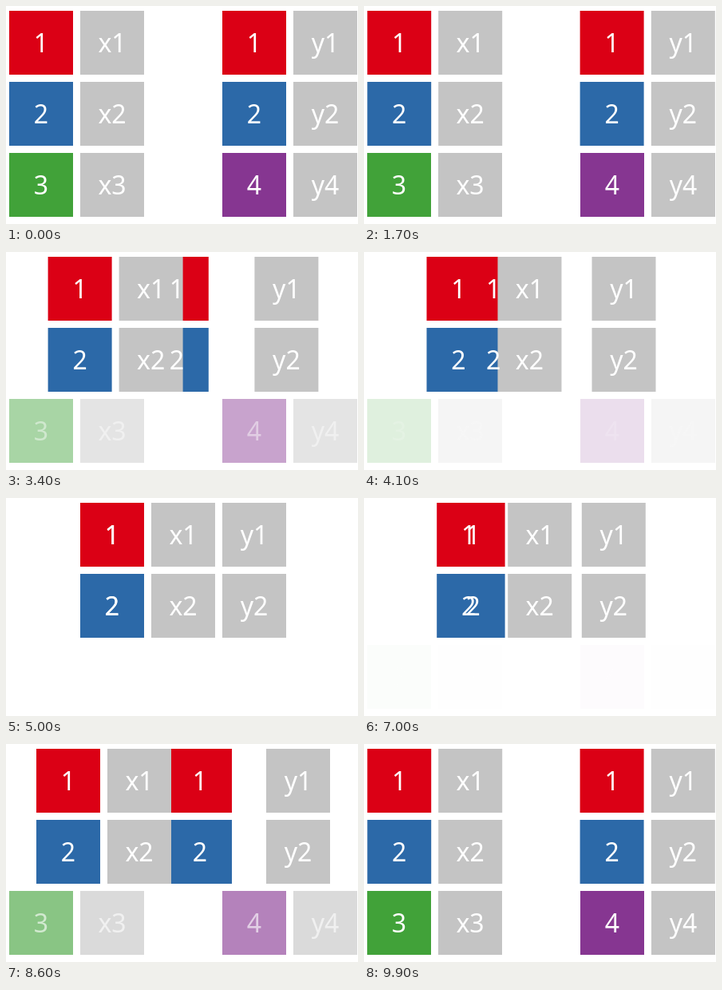
Write an HTML page that moves like this. It is 441 px wide and 273 px high and loops after 10000 ms.

```html
<!DOCTYPE html>
<html lang="en">
<head>
<meta charset="utf-8">
<title>Inner join</title>
<style>
  html, body { margin: 0; width: 100%; height: 100%; overflow: hidden; background: #fff; }
  svg { display: block; width: 441px; height: 273px; }
  text { font: 32px "Noto Sans", "Open Sans", sans-serif; fill: #fff; text-anchor: middle; }
</style>
</head>
<body>
<svg viewBox="0 0 441 273"><g id="tiles"></g><g id="labels"></g></svg>
<script>
const STEP = 100, STEPS = 100;
const SIZE = 80, PITCH = 89, LEFT = 4, TOP = 6, BASELINE = 52;
const RED = '#db0015', BLUE = '#2c69a8', GREEN = '#41a239', PURPLE = '#863691', GRAY = '#c4c4c4';

// label, colour, row, start column, end column (null: fades out in place)
const cells = [
  ['1', RED, 0, 3, 1], ['2', BLUE, 1, 3, 1], ['4', PURPLE, 2, 3, null],
  ['1', RED, 0, 0, 1], ['2', BLUE, 1, 0, 1], ['3', GREEN, 2, 0, null],
  ['x1', GRAY, 0, 1, 2], ['x2', GRAY, 1, 1, 2], ['x3', GRAY, 2, 1, null],
  ['y1', GRAY, 0, 4, 3], ['y2', GRAY, 1, 4, 3], ['y4', GRAY, 2, 4, null]
];

function add(parent, tag, attrs) {
  const el = document.createElementNS('http://www.w3.org/2000/svg', tag);
  for (const key in attrs) el.setAttribute(key, attrs[key]);
  return document.getElementById(parent).appendChild(el);
}

const parts = cells.map(([label, fill, row, from, to]) => {
  const y = TOP + row * PITCH;
  const tile = add('tiles', 'rect', { y, width: SIZE, height: SIZE, fill });
  const text = add('labels', 'text', { y: y + BASELINE });
  text.textContent = label;
  return { tile, text, from, to };
});

const sineInOut = t => (1 - Math.cos(Math.PI * Math.min(1, Math.max(0, t)))) / 2;

// 0 = two separate tables, 1 = joined table
const joined = i => sineInOut((i - 16) / 34) - sineInOut((i - 67) / 33);

function draw(i) {
  const p = joined(i);
  for (const { tile, text, from, to } of parts) {
    const fades = to === null;
    const x = LEFT + PITCH * (fades ? from : from + (to - from) * p);
    tile.setAttribute('x', x);
    text.setAttribute('x', x + SIZE / 2);
    if (fades) {
      tile.setAttribute('opacity', 1 - p);
      text.setAttribute('opacity', 1 - p);
    }
  }
}

const start = performance.now();
function tick() {
  draw(Math.floor((performance.now() - start) / STEP) % STEPS);
  requestAnimationFrame(tick);
}
tick();
</script>
</body>
</html>
```
